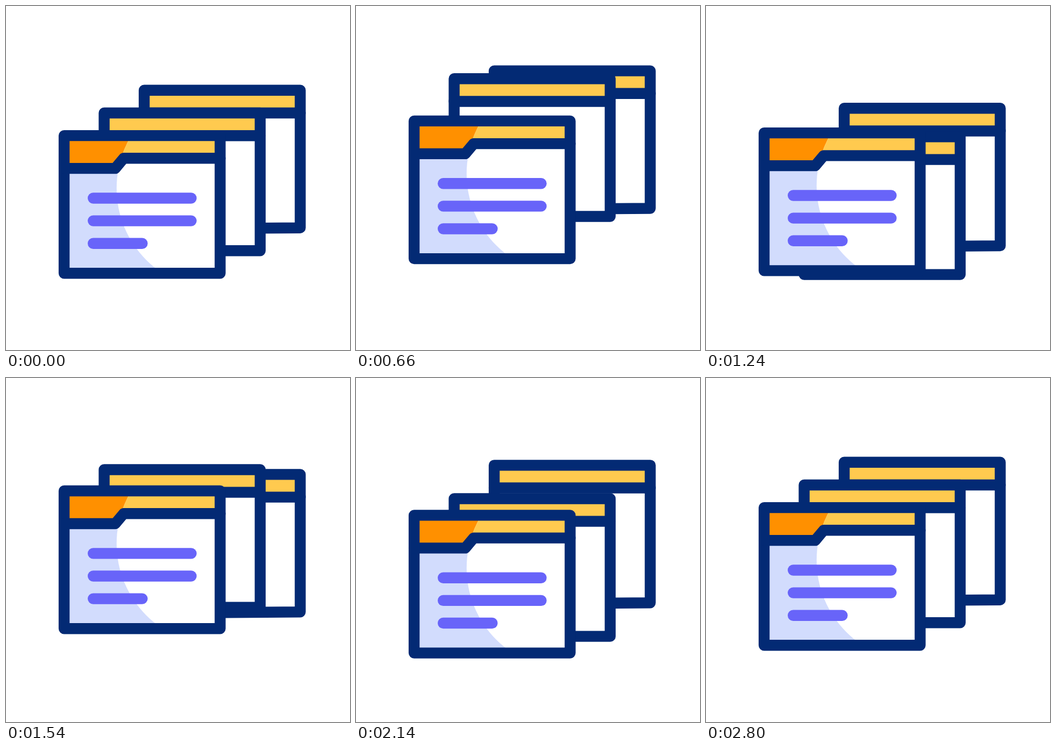
Recreate the animation shown at these times as an HTML page with a canvas. Size 640 by 640 pixels, loop 2.82 s.

```html
<!DOCTYPE html>
<html lang="en">
<head>
<meta charset="utf-8">
<title>Stacked folders</title>
<style>
html, body { margin: 0; width: 100%; height: 100%; overflow: hidden; background: #fff; }
canvas { display: block; width: 640px; height: 640px; }
</style>
</head>
<body>
<canvas id="stage"></canvas>
<script>
const SIZE = 640, LOOP = 2820, STEP = 480, DELAY = 200;
const SWING = [0, -64, 51.2, -38.4, 25.6, 0];
const NAVY = '#032a74', YELLOW = '#ffca4f', ORANGE = '#ff9000';
const LILAC = '#d2dcfd', PURPLE = '#6864f9', WHITE = '#fff';
const LINE = 20.4, W = 290.3, H = 256.2, BAND = 42.2;

const canvas = document.getElementById('stage');
const ctx = canvas.getContext('2d');
const dpr = window.devicePixelRatio || 1;
canvas.width = canvas.height = SIZE * dpr;
ctx.scale(dpr, dpr);
ctx.lineWidth = LINE;
ctx.lineCap = ctx.lineJoin = 'round';

// Vertical offset of a folder, a damped swing eased between extremes
function swing(t) {
  if (t <= 0 || t >= STEP * 5) return 0;
  const i = Math.floor(t / STEP), p = t / STEP - i;
  return SWING[i] + (SWING[i + 1] - SWING[i]) * p * p * (3 - 2 * p);
}

function trace(points, close) {
  ctx.beginPath();
  points.forEach(([x, y]) => ctx.lineTo(x, y));
  if (close) ctx.closePath();
}

function fill(points, color) {
  trace(points, true);
  ctx.fillStyle = color;
  ctx.fill();
}

function stroke(points, color, close) {
  trace(points, close);
  ctx.strokeStyle = color;
  ctx.stroke();
}

function backFolder(x, y, sag) {
  const frame = [[x, y], [x + W, y], [x + W, y + H - sag / 6], [x, y + H + sag]];
  fill(frame, WHITE);
  fill([[x, y], [x + W, y], [x + W, y + BAND], [x, y + BAND]], YELLOW);
  stroke(frame, NAVY, true);
  stroke([[x, y + BAND], [x + W, y + BAND]], NAVY);
}

function frontFolder(x, y) {
  const r = x + W, b = y + H;
  const frame = [[x, y], [r, y], [r, b], [x, b]];
  const tab = [[x, y + 61], [x + 95.1, y + 61], [x + 110.9, y + BAND], [r, y + BAND]];
  const head = [...tab, [r, y], [x, y]];

  fill(frame, LILAC);
  fill(head, ORANGE);

  // Lit side, bounded by a large circle
  ctx.save();
  trace(frame, true);
  ctx.clip();
  ctx.beginPath();
  ctx.arc(x + 286.7, y + 98, 189, 0, Math.PI * 2);
  ctx.clip();
  fill(frame, WHITE);
  fill(head, YELLOW);
  ctx.restore();

  stroke(frame, NAVY, true);
  stroke(tab, NAVY);
  [182.3, 182.3, 91.2].forEach((len, i) => {
    const ly = y + 116.4 + i * 42.1;
    stroke([[x + 54.1, ly], [x + 54.1 + len, ly]], PURPLE);
  });
}

function draw(t) {
  ctx.fillStyle = WHITE;
  ctx.fillRect(0, 0, SIZE, SIZE);
  backFolder(257.1, 156.8 + swing(t - 2 * DELAY), 1.9);
  backFolder(182.6, 199 + swing(t - DELAY), 0);
  frontFolder(108.1, 241.1 + swing(t));
}

const start = performance.now();
function tick() {
  draw((performance.now() - start) % LOOP);
  requestAnimationFrame(tick);
}
tick();
</script>
</body>
</html>
```
